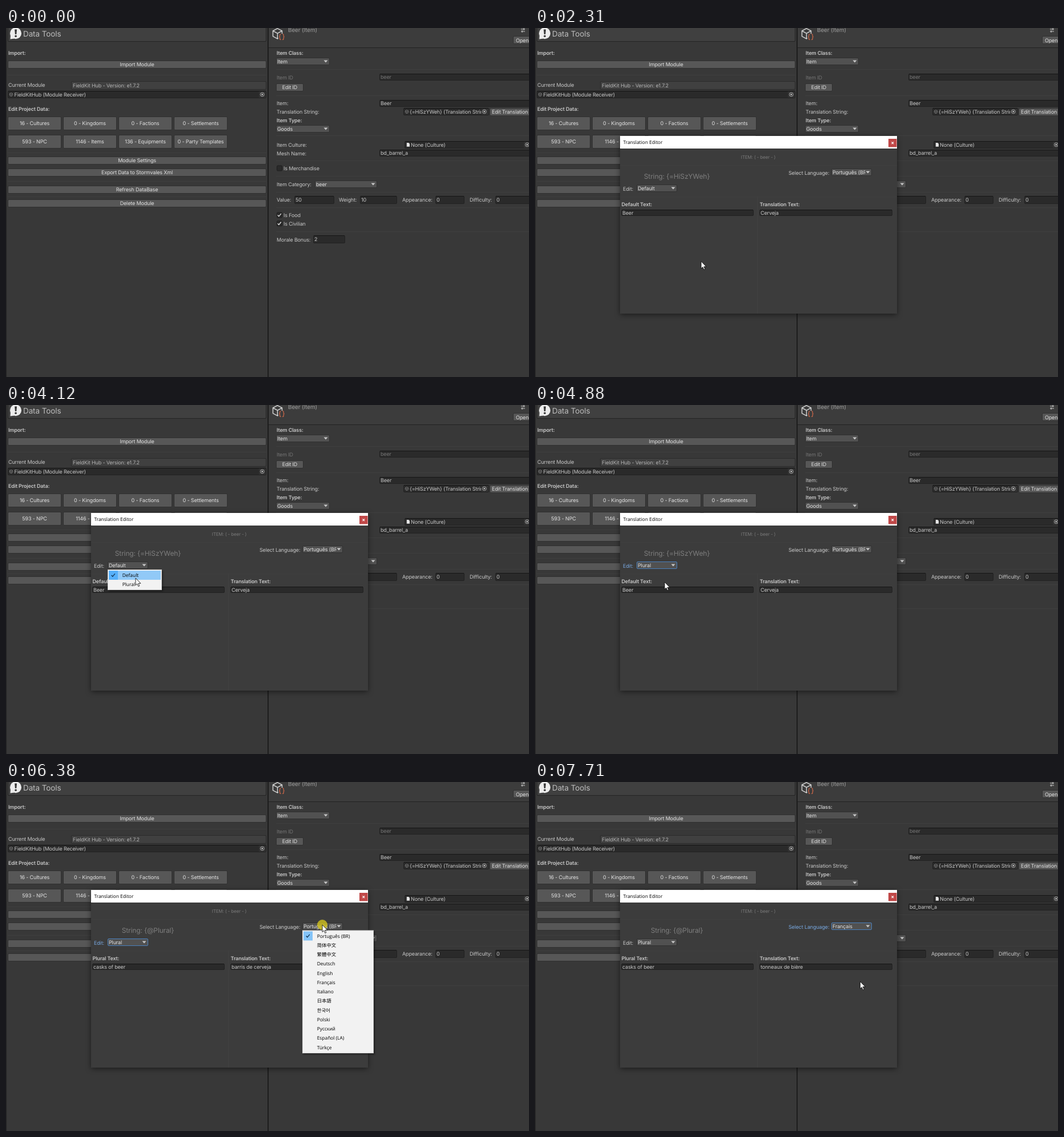
These frames come from a looping animation (916 px wide and 611 px high, 8 s). An HTML page:

```html
<!DOCTYPE html>
<html lang="en">
<head>
<meta charset="utf-8">
<title>Translation Editor</title>
<style>
html, body { margin: 0; width: 100%; height: 100%; overflow: hidden; background: #383838; }
svg { display: block; }
text { font: 9px Inter, sans-serif; letter-spacing: -.15px; fill: #c8c8c8; white-space: pre; text-rendering: geometricPrecision; }
.bold { font-weight: 600; }
.mid { text-anchor: middle; }
.dim { fill: #757575; }
.soft { fill: #b4b4b4; }
.btn { fill: #e2e2e2; }
.title { font-size: 13.5px; fill: #bdbdbd; letter-spacing: -.1px; }
.head { font-size: 10px; fill: #9a9a9a; }
.string { font-size: 12px; fill: #7e7e7e; }
.tiny { font-size: 8px; fill: #7a7a7a; }
.sys { font: 8.4px 'Open Sans', 'Noto Sans CJK SC', 'Noto Sans CJK', 'Noto Sans', sans-serif; letter-spacing: 0; fill: #000; }
.focus rect { stroke: #4a80bd; }
text.focus { fill: #78a8e0; }
.window { filter: drop-shadow(0 2px 5px rgba(0, 0, 0, .5)); }
.sheet { filter: drop-shadow(2px 2px 1.5px rgba(0, 0, 0, .4)); }
</style>
</head>
<body>
<svg id="stage" width="916" height="611" viewBox="0 0 916 611"></svg>
<script>
const LOOP = 8000, STEP = 78, ROW = 16.25;
const LANGS = ['Português (BR)', '简体中文', '繁體中文', 'Deutsch', 'English', 'Français', 'Italiano',
  '日本語', '한국어', 'Polski', 'Русский', 'Español (LA)', 'Türkçe'];

// Drawing helpers; text is placed by its vertical centre.
const text = (x, cy, s, cls = '', id = '') =>
  `<text x="${x}" y="${cy + 3.2}" class="${cls}"${id && ` id="${id}"`}>${s}</text>`;
const rect = (x, y, w, h, fill, extra = '') =>
  `<rect x="${x}" y="${y}" width="${w}" height="${h}" fill="${fill}" ${extra}/>`;
const line = (x, y, w) => rect(x, y, w, 1, '#3f3f3f');
const box = (x1, y1, x2, y2, fill, stroke, rx = 1.5) =>
  rect(x1 + .5, y1 + .5, x2 - x1 - 1, y2 - y1 - 1, fill, `rx="${rx}" stroke="${stroke}"`);
const button = (x1, y1, x2, y2, s) =>
  box(x1, y1, x2, y2, '#575757', '#303030') + text((x1 + x2) / 2, (y1 + y2) / 2, s, 'btn mid');
const field = (x1, y1, x2, y2, s = '', cls = '', id = '') =>
  box(x1, y1, x2, y2, '#2a2a2a', '#222') + rect(x1 + 1, y1, x2 - x1 - 2, 1, '#151515') +
  text(x1 + 2, (y1 + y2) / 2, s, cls, id);
const clip = (x1, y1, x2, y2, inner) =>
  `<svg x="${x1}" y="${y1}" width="${x2 - x1}" height="${y2 - y1}" viewBox="${x1} ${y1} ${x2 - x1} ${y2 - y1}">${inner}</svg>`;
const popup = (x1, y1, x2, y2, s, id = '') => {
  const cy = (y1 + y2) / 2;
  return `<g${id && ` id="${id}"`}>` + box(x1, y1, x2, y2, '#515151', '#303030') +
    clip(x1, y1, x2 - 11.5, y2, text(x1 + 2, cy + .2, s, 'btn')) +
    `<path d="M${x2 - 10.5} ${cy - 2}h7l-3.5 4z" fill="#c8c8c8"/></g>`;
};
const picker = (x, y) =>
  `<circle cx="${x}" cy="${y}" r="3.4" fill="none" stroke="#b4b4b4" stroke-width=".9"/><circle cx="${x}" cy="${y}" r="1.4" fill="#c4c4c4"/>`;
const cubelet = (x, y) =>
  `<path d="M${x} ${y - 3}l2.7 1.5v3l-2.7 1.5-2.7-1.5v-3zM${x - 2.7} ${y - 1.5}l2.7 1.5 2.7-1.5M${x} ${y}v3" fill="none" stroke="#8c8c8c" stroke-width=".7"/>`;
const tick = (x, y, color) =>
  `<path d="M${x - 3} ${y}l2.1 2.3 4-5" fill="none" stroke="${color}" stroke-width="1.3"/>`;
const check = (cy, s, on) => box(474, cy - 5, 484, cy + 5, '#2a2a2a', '#1e1e1e') +
  (on ? tick(478.8, cy, '#e4e4e4') : '') + text(486, cy + .3, s);

function leftPanel() {
  const cells = [['16 - Cultures', '0 - Kingdoms', '0 - Factions', '0 - Settlements'],
    ['593 - NPC', '1146 - Items', '136 - Equipments', '0 - Party Templates']];
  return rect(0, 0, 1, 611, '#232323') +
    box(3, -6, 456, 24, '#404040', '#242424') +
    `<circle cx="17" cy="9.3" r="10" fill="#ececec"/><path d="M8 13l-.5 6.5 7-1z" fill="#ececec"/>` +
    `<path d="M15.2 2.5h3.8l-.7 8.6h-2.4z" fill="#333"/><circle cx="17.1" cy="14.2" r="1.8" fill="#333"/>` +
    text(30, 11.6, 'Data Tools', 'title') +
    text(4, 43.5, 'Import:', 'bold') + button(3, 57, 456, 71, 'Import Module') +
    line(3, 82, 453) +
    text(4, 100, 'Current Module') + box(114, 93, 456, 108, '#404040', '#2a2a2a') +
    text(117, 100.5, 'FieldKit Hub - Version: e1.7.2', 'soft') +
    field(3, 110, 456, 123) + cubelet(9, 116.5) +
    text(14.5, 116.7, 'FieldKitHub (Module Receiver)') +
    rect(443, 111, 12, 11, '#323232') + picker(448.8, 116.4) +
    text(4, 142, 'Edit Project Data:', 'bold') +
    cells.map((row, j) => row.map((s, i) => {
      const x = 3 + Math.round(i * 96.9), y = 155 + j * 32;
      return button(x, y, x + 94, y + 24, s);
    }).join('')).join('') +
    line(3, 218, 453) + button(3, 225, 456, 239, 'Module Settings') +
    button(3, 246, 456, 260, 'Export Data to Stormvales Xml') +
    line(3, 268, 453) + button(3, 276, 456, 290, 'Refresh DataBase') +
    line(3, 295, 453) + button(3, 300, 456, 314, 'Delete Module');
}

function rightPanel() {
  return rect(458, 0, 2, 611, '#1d1d1d') + rect(460, 0, 456, 34, '#3c3c3c') + rect(460, 34, 456, 1, '#222') +
    `<path d="M475.5 .8l8 4.2v9.6l-8 4.4-8-4.4V5zM467.5 5l8 4.4 8-4.4M475.5 9.4V19" fill="none" stroke="#d0d0d0" stroke-width="1.5"/>` +
    rect(477, 10, 12, 11, '#3c3c3c') +
    `<path d="M481.6 10.5q-2 0-2 2v1.7q0 1.3-1.4 1.3 1.4 0 1.4 1.3v1.7q0 2 2 2M484.2 10.5q2 0 2 2v1.7q0 1.3 1.4 1.3-1.4 0-1.4 1.3v1.7q0 2-2 2" fill="none" stroke="#d0694a" stroke-width="1.2"/>` +
    text(494, 4.2, 'Beer (Item)', 'head') +
    `<path d="M902 2h7M902 6h7M907 0v4M904 4v4" stroke="#c4c4c4" stroke-width="1.1"/>` +
    box(888, 14, 925, 28, '#575757', '#303030') + text(893, 21.3, 'Open', 'btn') +
    text(474, 44, 'Item Class:', 'bold') + popup(473, 52, 567, 65, 'Item') + line(473, 72, 443) +
    text(474, 86.3, 'Item ID', 'dim') + field(654, 80, 925, 92, 'beer', 'dim') +
    button(473, 97, 521, 111, 'Edit ID') + line(473, 118, 443) +
    text(474, 132, 'Item:') + field(654, 126, 925, 138, 'Beer') +
    text(474, 147, 'Translation String:') + field(696, 140, 846, 153) + cubelet(702, 146.6) +
    clip(696, 140, 832, 153, text(707, 146.8, '{=HiSzYWeh} (Translation String)')) +
    rect(833, 141, 12, 11, '#323232') + picker(837.8, 146.4) +
    box(847, 140, 930, 154, '#575757', '#303030').replace('<rect', '<rect id="editBtn"') +
    text(851, 147, 'Edit Translation', 'btn') +
    text(474, 162, 'Item Type:', 'bold') + popup(473, 170, 567, 183, 'Goods') + line(473, 188, 443) +
    text(474, 204.3, 'Item Culture:') + field(698, 198, 925, 211) +
    `<path d="M701.8 201h3.4l1.8 1.8v5h-5.2z" fill="#e4e4e4"/>` + text(709, 204.5, 'None (Culture)') +
    rect(907, 199, 9, 11, '#323232') + picker(912.8, 204.3) +
    text(474, 219.3, 'Mesh Name:') + field(654, 213, 925, 225, 'bd_barrel_a') + line(473, 232, 443) +
    check(245.5, 'Is Merchandise') + line(473, 259, 443) +
    text(474, 273.7, 'Item Category:') + popup(541, 267, 650, 280, 'beer') + line(473, 287, 443) +
    text(474, 301, 'Value:') + field(505, 294, 575, 308, '50') +
    text(583, 301, 'Weight:') + field(620, 294, 685, 308, '10') +
    text(694, 301, 'Appearance:') + field(752, 294, 803, 308, '0') +
    text(812, 301, 'Difficulty:') + field(857, 294, 925, 308, '0') + line(473, 314, 443) +
    check(327.5, 'Is Food', true) + check(342.2, 'Is Civilian', true) + line(473, 356, 443) +
    text(474, 370.5, 'Morale Bonus:') + field(538, 363, 594, 377, '2');
}

function dialog() {
  return `<g id="dialog">` + rect(149, 189, 485, 311, '#3c3c3c', 'class="window"') +
    rect(149, 189, 485, 22, '#fff') + text(154.5, 200, 'Translation Editor', 'sys') +
    rect(619, 194, 14.5, 14.5, '#c04848') +
    `<path d="M624.5 199.5l3.6 3.6m0-3.6l-3.6 3.6" stroke="#fff" stroke-width="1.1"/>` +
    text(391, 225.8, 'ITEM: ( - beer - )', 'tiny mid') + line(149, 240, 485) +
    text(248.5, 260.6, '', 'string mid', 'string') +
    text(444, 253.3, 'Select Language:', '', 'langLabel') + popup(519, 246, 590, 259, '', 'langPop') +
    text(154, 281.3, 'Edit:', '', 'editLabel') + popup(178, 274, 249, 287, '', 'editPop') +
    line(149, 295, 485) + rect(389, 295, 1, 205, '#414141') +
    text(151.5, 309, '', 'bold', 'kind') + field(151, 318, 383, 329, '', '', 'baseText') +
    text(393.5, 309, 'Translation Text:', 'bold') + field(393, 318, 626, 329, '', '', 'transText') + '</g>';
}

function menu(id, x, y, w, h, rows) {
  return `<g id="${id}">` + rect(x + .5, y + .5, w - 1, h - 1, '#f2f2f2', 'stroke="#cfcfcf" class="sheet"') +
    rect(x + 2, 0, w - 4, 16, '#91c9f7', 'class="hover"') +
    rect(x + 2, y + 2, 16, 16, '#91c9f7', 'class="mark"') + tick(x + 9.7, y + 10, '#12304e') +
    rows.map((s, i) => text(x + 25.7, y + 10 + i * ROW, s, 'sys')).join('') + '</g>';
}

const stage = document.getElementById('stage');
stage.innerHTML = rect(0, 0, 916, 611, '#383838') + leftPanel() + rightPanel() + dialog() +
  menu('editMenu', 178, 288, 95, 36, ['Default', 'Plural']) +
  menu('langMenu', 519, 259.5, 125, 215.5, LANGS) +
  `<circle id="click" r="9" fill="#d6c51c" fill-opacity=".78"/>` +
  `<path id="cursor" d="M0 0V12.6L2.8 10 4.8 14.6 6.8 13.7 4.8 9.3H8.9Z" fill="#fff" stroke="#000" stroke-width=".8"/>`;
const $ = Object.fromEntries([...stage.querySelectorAll('[id]')].map(e => [e.id, e]));

// Pointer keys: time, x, y
const KEYS = [[0, 918, 574], [132, 918, 574], [985, 867.5, 147], [1762, 867.5, 147], [2308, 291, 408.5],
  [2466, 172, 394], [2622, 190, 362], [2934, 344, 318], [3324, 223, 281], [3872, 223, 281],
  [4106, 227, 303], [4262, 227, 309], [4450, 227, 310], [5272, 227, 310], [5740, 460.5, 321.5],
  [6130, 546, 245], [6220, 554, 250], [6682, 554, 250], [7540, 569.5, 349.3], [LOOP, 569.5, 349.3]];
const STARTS = [0, 210, 1840, 2700, 3950, 4450, 5350, 6220, 6760];

function slope(i, axis) {
  const a = KEYS[i - 1], b = KEYS[i], c = KEYS[i + 1];
  if (!a || !c || a[axis] === b[axis] || b[axis] === c[axis]) return 0;
  return (c[axis] - a[axis]) / (c[0] - a[0]);
}

function pointer(time) {
  const start = STARTS.filter(s => s <= time).pop();
  const t = start + Math.floor((time - start) / STEP) * STEP;
  const i = Math.max(0, KEYS.findIndex(k => k[0] > t) - 1);
  const a = KEYS[i], b = KEYS[i + 1], d = b[0] - a[0], u = (t - a[0]) / d, v = 1 - u;
  return [1, 2].map(n => v * v * (1 + 2 * u) * a[n] + u * u * (3 - 2 * u) * b[n] +
    d * u * v * (v * slope(i, n) - u * slope(i + 1, n)));
}

const show = (el, on) => el.setAttribute('visibility', on ? 'visible' : 'hidden');
const focus = (name, on) => [$[name + 'Label'], $[name + 'Pop']].forEach(e => e.classList.toggle('focus', on));
const setPopup = (name, s) => { $[name + 'Pop'].querySelector('text').textContent = s; };

function setMenu(el, on, top, count, y) {
  show(el, on);
  const row = Math.floor((y - top - 2) / ROW), hit = on && row >= 0 && row < count;
  const hover = el.querySelector('.hover');
  show(hover, hit);
  hover.setAttribute('y', top + 2 + row * ROW);
  el.querySelector('.mark').setAttribute('fill', hit && row === 0 ? '#56b0fa' : '#84c4f8');
}

function render(t) {
  const within = (a, b) => t >= a && t < b;
  const [x, y] = pointer(t);
  const plural = t >= 4970, french = t >= 7710;
  $.cursor.setAttribute('transform', `translate(${x} ${y})`);
  $.click.setAttribute('transform', `translate(${x} ${y})`);
  show($.click, within(1060, 1210) || within(3570, 3730) || within(6380, 6530));
  $.editBtn.setAttribute('fill', within(1060, 1210) ? '#46607c' : '#575757');
  $.dialog.style.display = t >= 1210 ? '' : 'none';
  setMenu($.editMenu, within(3570, 4880), 288, 2, y);
  setMenu($.langMenu, within(6380, 7710), 259.5, LANGS.length, y);
  setPopup('edit', t >= 4880 ? 'Plural' : 'Default');
  setPopup('lang', french ? LANGS[5] : LANGS[0]);
  focus('edit', within(4880, 7710));
  focus('lang', french);
  $.string.textContent = plural ? 'String: {@Plural}' : 'String: {=HiSzYWeh}';
  $.kind.textContent = plural ? 'Plural Text:' : 'Default Text:';
  $.baseText.textContent = plural ? 'casks of beer' : 'Beer';
  $.transText.textContent = french ? 'tonneaux de bière' : plural ? 'barris de cerveja' : 'Cerveja';
}

const begin = performance.now();
function tickFrame() {
  render((performance.now() - begin) % LOOP);
  requestAnimationFrame(tickFrame);
}
tickFrame();
</script>
</body>
</html>
```
